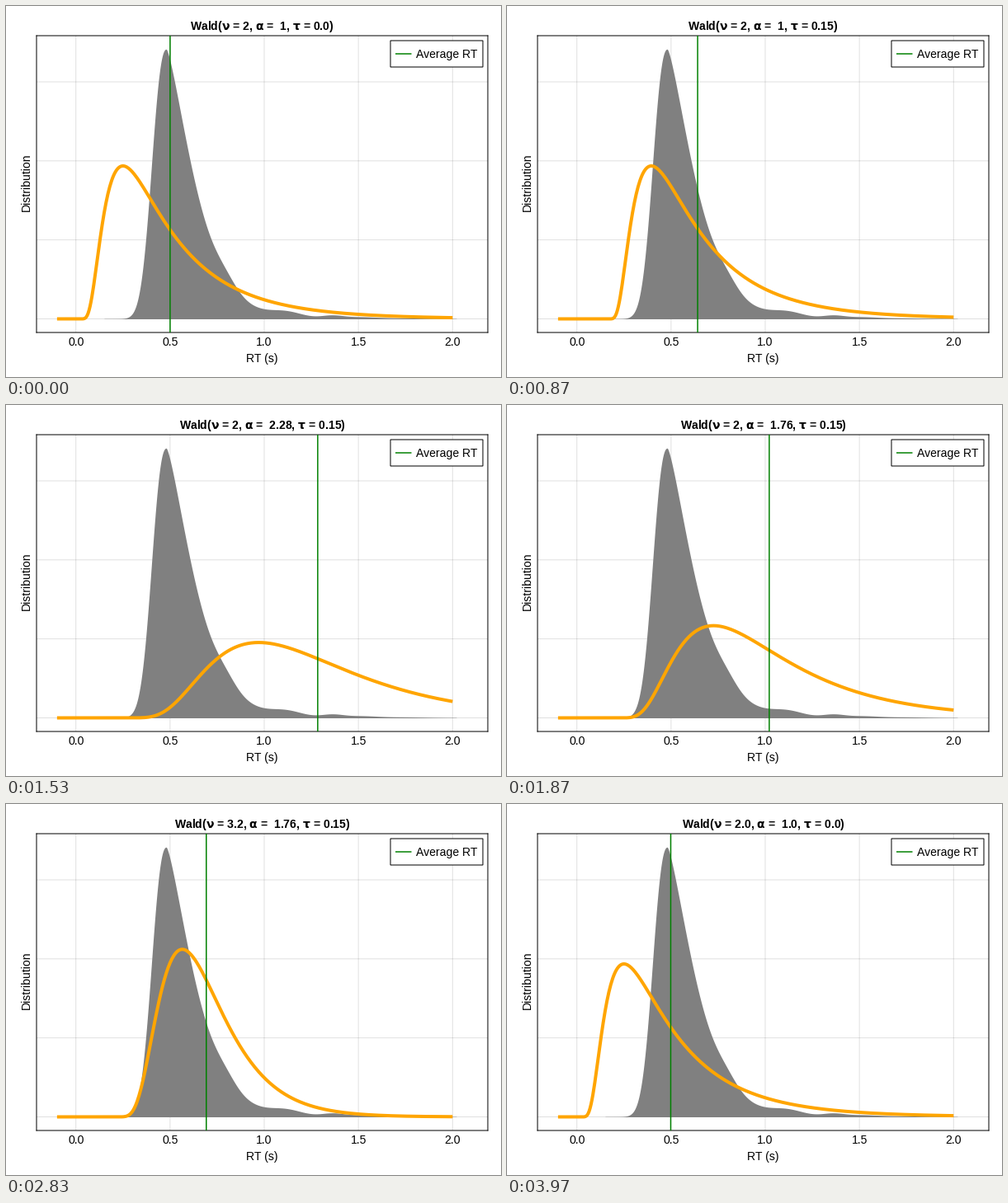
A matplotlib script for the animation above (4010 ms loop, 600 by 450 pixels).

```python
import numpy as np
import matplotlib as mpl
import matplotlib.pyplot as plt
from matplotlib.animation import FuncAnimation
from matplotlib.patches import Rectangle

W, H, DPI = 600, 450, 100
LOOP, FRAMES = 4010, 200
STEPS, RATE = 120, 30  # poses per loop, poses per second
PX = 72 / DPI  # one pixel in points
LEFT, RIGHT, TOP, BOTTOM = 37, 584, 36, 396
X0, Y0, SX, SY = 84.7, 379.5, 228.3, 95.83  # data origin and scale in pixels

mpl.rcParams.update({
    "font.family": "Liberation Sans",
    "font.size": 14 * PX,
    "mathtext.fontset": "custom",
    "mathtext.it": "DejaVu Sans:bold",
    "mathtext.default": "it",
})

# Parameter moves: (start, end, from, to)
DRIFT = [(0.55, 0.65, 2, 1.25), (0.65, 0.75, 1.25, 4), (0.8, 1, 4, 2)]
BOUND = [(0.25, 0.35, 1, 2.5), (0.35, 0.45, 2.5, 1.757), (0.8, 1, 1.757, 1)]
SHIFT = [(0, 0.15, 0, 0.1452), (0.8, 1, 0.1452, 0)]


def ease(frac, moves):
    """Cosine easing through the moves, holding in between."""
    value = moves[0][2]
    for start, end, a, b in moves:
        if frac >= start:
            u = min((frac - start) / (end - start), 1)
            value = float(a + (b - a) * (1 - np.cos(np.pi * u)) / 2)
    return value


def wald(x, nu, alpha, tau):
    t = np.maximum(x - tau, 1e-6)
    pdf = alpha / np.sqrt(2 * np.pi * t**3) * np.exp(-(alpha - nu * t)**2 / (2 * t))
    return np.where(x > tau, pdf, 0)


def observed(x):
    """Skewed peak with a few small bumps along the tail."""
    d = x - 0.48
    power = np.where(d < 0, (np.abs(d) / 0.1)**2.35, (np.abs(d) / 0.2015)**1.35)
    y = 3.412 * np.exp(-power) + 0.003
    for mid, width, height in [(0.795, 0.057, 0.083), (1.115, 0.088, 0.073),
                               (1.36, 0.06, 0.04), (1.51, 0.08, 0.02),
                               (1.71, 0.13, 0.009)]:
        y += height * np.exp(-((x - mid) / width)**2 / 2)
    return y


fig = plt.figure(figsize=(W / DPI, H / DPI), dpi=DPI, facecolor="white")
ax = fig.add_axes([LEFT / W, 1 - BOTTOM / H, (RIGHT - LEFT) / W, (BOTTOM - TOP) / H])
ax.set_xlim((LEFT - X0) / SX, (RIGHT - X0) / SX)
ax.set_ylim((Y0 - BOTTOM) / SY, (Y0 - TOP) / SY)
ax.set_xticks([])
ax.set_yticks([])
for spine in ax.spines.values():
    spine.set(linewidth=PX, snap=False)

ticks = np.arange(0, 2.1, 0.5)
grid = dict(color="black", alpha=0.12, lw=PX, zorder=1, snap=False)
for t in ticks:
    ax.axvline(t, **grid)
for y in range(4):
    ax.axhline(y, **grid)


def label(x, y, s, **kw):
    kw = {"ha": "center", "va": "baseline", **kw}
    return fig.text(x / W, 1 - y / H, s, **kw)


for t in ticks:
    label(X0 + SX * t, 412.5, f"{t:.1f}")
label(310.5, 432, "RT (s)")
label(31.5, 214, "Distribution", rotation=90, ha="right", va="center")
title = label(310.5, 29, "", weight="bold")

ts = np.linspace(0.15, 2.02, 600)
ax.fill_between(ts, observed(ts), 0, color="#808080", lw=0, zorder=2)

xs = np.linspace(-0.1, 2, 421)
curve, = ax.plot(xs, 0 * xs, color="orange", lw=4 * PX, zorder=3,
                 solid_capstyle="butt", solid_joinstyle="round")
mean_line = ax.axvline(0.5, color="green", lw=1.5 * PX, zorder=4, snap=False)

# Legend
fig.add_artist(Rectangle((466 / W, 1 - 74 / H), 112 / W, 32 / H, fc="white",
                         ec="black", lw=PX, zorder=6, snap=False))
fig.add_artist(plt.Line2D([472 / W, 491.5 / W], [1 - 58 / H] * 2, color="green",
                          lw=1.5 * PX, solid_capstyle="butt", zorder=7, snap=False))
label(497, 63, "Average RT", ha="left", zorder=7)


def update(i):
    ms = i * LOOP / FRAMES + 11  # middle of the frame's slot
    step = min(int(ms * RATE / 1000), STEPS - 1)
    nu, alpha, tau = (ease(step / (STEPS - 1), m) for m in (DRIFT, BOUND, SHIFT))
    curve.set_ydata(wald(xs, nu, alpha, tau))
    # The average is that of a finite sample, so it trembles slightly
    noise = np.random.default_rng(step).normal() * 0.006 * np.sqrt(alpha / nu**3)
    mean_line.set_xdata([alpha / nu + tau + noise] * 2)
    title.set_text(f"Wald($ν$ = {round(nu, 1)}, $α$ =  {round(alpha, 2)}, "
                   f"$τ$ = {round(tau, 2)})")
    return curve, mean_line, title


anim = FuncAnimation(fig, update, frames=FRAMES, interval=LOOP / FRAMES,
                     repeat=True, repeat_delay=0)
plt.show()
```
